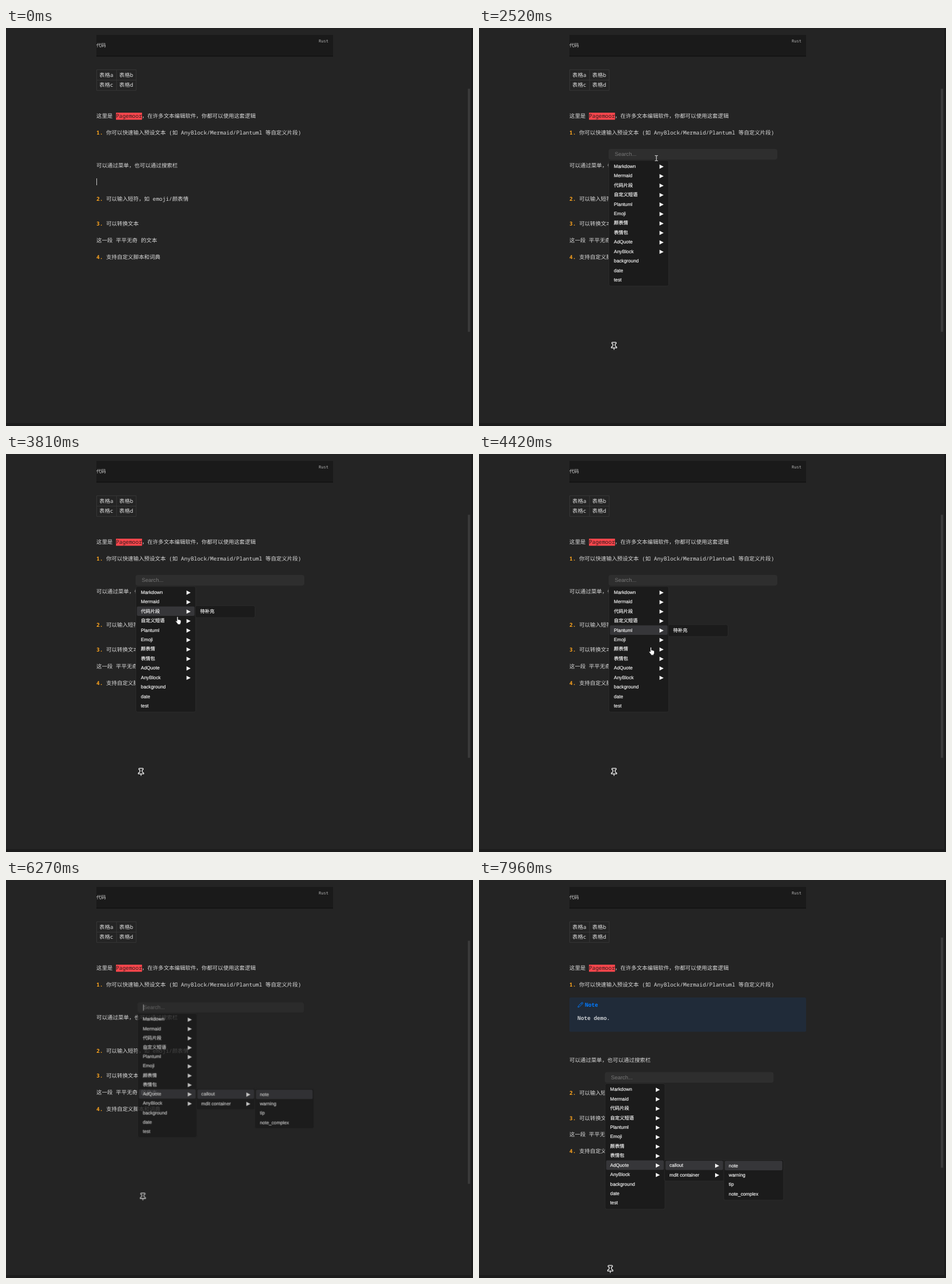
Animation of 811x691 px, one loop 8 s. Source, as an HTML page:

```html
<!DOCTYPE html>
<html lang="zh">
<head>
<meta charset="utf-8">
<style>
  html, body { margin: 0; width: 100%; height: 100%; overflow: hidden; background: #242424; }
  svg { position: fixed; left: 0; top: 0; }
  text { text-rendering: geometricPrecision; white-space: pre; }
  .doc { font: 9.42px "Noto Sans Mono", "Noto Sans CJK SC", "Noto Sans CJK JP", monospace; fill: #dadada; }
  .doc .num { fill: #ffa51e; font-weight: 600; }
  .doc .bold { font-weight: 600; }
  .doc .head { font-weight: 500; }
  .menu { font: 8.24px "Liberation Sans", "Noto Sans CJK SC", "Noto Sans CJK JP", sans-serif; }
  .menu .item { fill: #f0f0f0; stroke: #f0f0f0; stroke-width: .2px; }
</style>
</head>
<body>
<svg width="811" height="691" viewBox="0 0 811 691">
  <rect width="811" height="691" fill="#242424"/>
  <rect x="808" width="3" height="691" fill="#1c1c1c"/>
  <rect y="686" width="811" height="5" fill="#1c1c1c"/>
  <rect id="thumb" x="802" width="4" fill="#3a3a3a"/>
  <g class="doc">
    <rect x="157" y="12" width="411" height="37" fill="#1a1a1a"/>
    <rect x="157" y="48" width="411" height="1.5" fill="#101010"/>
    <path d="M157.5 72.5H226V108.3H157.5ZM192 72.5V108.3M157.5 90.5H226" fill="none" stroke="#363636"/>
    <rect x="191" y="147" width="45.2" height="12.3" fill="#fb464c"/>
    <g id="lines"></g>
    <g id="callout">
      <rect x="157" y="204" width="411" height="59.5" rx="2" fill="#202b39"/>
      <path transform="translate(171 211.5) scale(.43)" fill="none" stroke="#027aff" stroke-width="2.2" stroke-linejoin="round"
        d="M17 3a2.8 2.8 0 1 1 4 4L7.5 20.5 2 22l1.5-5.5ZM15 5l4 4"/>
      <text x="184" y="220" class="bold" style="fill:#027aff">Note</text>
      <text x="171" y="242.6" class="bold" style="fill:#c4c8cc">Note demo.</text>
    </g>
    <g id="lower"></g>
  </g>
  <rect id="caret" x="157" width="1" height="12" fill="#c8c8c8"/>
  <g id="menu" class="menu"></g>
  <path id="beam" d="M-2.5-4.5H-.6L0-4 .6-4.5H2.5M0-4V4M-2.5 4.5H-.6L0 4 .6 4.5H2.5" fill="none" stroke="#eee"/>
  <path id="hand" fill="#fff" stroke="#111" stroke-width=".8" stroke-linejoin="round"
    d="M-2.6-2Q-1.6-3.5-.5-2V2.5Q.7 1.8 1.4 2.9Q2.4 2.3 3 3.4Q4.3 3 4.5 4.6V7Q4.4 8.5 3.5 9.5V11H-1.5V9.8L-4.6 6Q-5.2 4.3-3.7 4.5L-2.6 5.5Z"/>
</svg>
<script>
const $ = id => document.getElementById(id);
const LOOP = 8000, ROW = 16.43;
const MENU_X = 225, FIRST_ROW = 240, SUB_STEP = 103;
const OPEN = 1820, CLICK = 6230, INSERT = 6550, REOPEN = 7960;

const text = (x, cy, content, attrs = '') => `<text x="${x}" y="${cy + 3.4}" ${attrs}>${content}</text>`;
const numbered = (cy, n, content) =>
  text(157, cy, `<tspan class="num">${n}.</tspan> ${content}`);

$('lines').innerHTML =
  text(157, 29.8, '代码', 'font-size="8.24"') +
  text(543, 22, 'Rust', 'font-size="7.06" style="fill:#b8b8b8"') +
  text(162, 81.2, '表格a', 'class="head"') + text(196.5, 81.2, '表格b', 'class="head"') +
  text(162, 99, '表格c') + text(196.5, 99, '表格d') +
  text(157, 153, '这里是 <tspan fill="#2c1c1d">Pagemoor</tspan>，在许多文本编辑软件，你都可以使用这套逻辑') +
  numbered(182, 1, '你可以快速输入预设文本 (如 AnyBlock/Mermaid/Plantuml 等自定义片段)');

$('lower').innerHTML =
  text(157, 239, '可以通过菜单，也可以通过搜索栏') +
  numbered(296.5, 2, '可以输入短符，如 emoji/颜表情') +
  numbered(340, 3, '可以转换文本') +
  text(157, 368.7, '这一段 平平无奇 的文本') +
  numbered(397.5, 4, '支持自定义脚本和词典');

// Menu tree: [label, children]
const leaves = names => names.split(' ').map(name => [name]);
const pending = leaves('待补充');
const kinds = leaves('note warning tip note_complex');
const tree = [
  ['Markdown', leaves('标题 列表 引用 代码 表格 链接 图片 公式 任务 脚注 分割线')],
  ['Mermaid', leaves('flowchart sequence class state er journey gantt pie mindmap timeline git')],
  ['代码片段', pending], ['自定义短语', pending], ['Plantuml', pending],
  ['Emoji', pending], ['颜表情', pending], ['表情包', pending],
  ['AdQuote', [['callout', kinds], ['mdit container', kinds]]],
  ['AnyBlock', pending], ['background'], ['date'], ['test'],
];

function panel(items, x, cy, [active, ...rest]) {
  let svg = `<rect x="${x + .5}" y="${cy - 10}" width="104" height="${items.length * ROW + 4.5}" rx="3" fill="#1b1b1b" stroke="#2b2b2b"/>`;
  let child = '';
  items.forEach(([label, children], i) => {
    const y = cy + i * ROW;
    if (i === active) {
      svg += `<rect x="${x + 2.3}" y="${y - 8.2}" width="100" height="16.4" rx="2" fill="#363639"/>`;
      if (children) child = panel(children, x + SUB_STEP, y + .4, rest);
    }
    svg += `<text class="item" x="${x + 9.3}" y="${y + 2.8}">${label}</text>`;
    if (children) svg += `<path d="M${x + 88.5} ${y - 2.9}l7.2 3.7-7.2 3.7Z" fill="#f2f2f2"/>`;
  });
  return svg + child;
}

const menuSvg = path => `
  <rect x="225" y="210" width="293" height="18.5" rx="4" fill="#2e2e2e"/>
  <text x="235.7" y="222.3" font-size="9.42" fill="#777">Search...</text>
  <rect id="inputCaret" x="235" y="214" width="1" height="11" fill="#ddd"/>
  ${panel(tree, MENU_X, FIRST_ROW, path)}
  <path transform="translate(226.7 544.4) scale(.65)" fill="none" stroke="#f4f4f4" stroke-width="2" stroke-linejoin="round"
    d="M12 17v5M5 17h14v-1.76a2 2 0 0 0-1.11-1.79l-1.78-.9A2 2 0 0 1 15 10.76V6h1a2 2 0 0 0 0-4H8a2 2 0 0 0 0 4h1v4.76a2 2 0 0 1-1.11 1.79l-1.78.9A2 2 0 0 0 5 15.24Z"/>`;

// Pointer glides: start, end, x, y
const ENTRY = { x: 311, y: 208 };
const glides = [
  [2360, 3020, 299, 282], [3100, 3160, 299, 270], [3700, 3960, 300, 305],
  [4390, 4420, 300, 338], [4420, 4720, 299, 379], [5080, 5140, 299, 374],
  [5400, 5720, 370, 374], [5840, 6030, 452, 376],
];

const progress = (t, start, end) => Math.min(1, Math.max(0, (t - start) / (end - start)));

const pointerAt = t => glides.reduce((p, [start, end, x, y]) => {
  const k = progress(t, start, end);
  return { x: p.x + (x - p.x) * k, y: p.y + (y - p.y) * k };
}, ENTRY);

// Rows open under the pointer, slightly late; moving right descends into submenus.
function hoverPath(t) {
  const { x, y } = pointerAt(t - 60);
  const row = Math.floor((y - FIRST_ROW) / ROW + .5);
  if (row < 0) return [];
  const depth = Math.max(0, Math.floor((x - MENU_X - 3) / SUB_STEP));
  return [row, ...Array(depth).fill(0)];
}

const blink = (t, since) => (t - since) % 1020 < 500;
// Editor caret placements: time, y
const placements = [[0, 261], [1120, 204.5], [INSERT, 278], [7300, 320.5]];

const show = (node, on) => node.setAttribute('visibility', on ? 'visible' : 'hidden');
let drawnPath;

function render(t) {
  const inserted = t >= INSERT;
  show($('callout'), inserted);
  $('lower').setAttribute('transform', `translate(0 ${inserted ? 73.2 : 0})`);
  $('thumb').setAttribute('y', inserted ? 100 : 105.5);
  $('thumb').setAttribute('height', inserted ? 399.5 : 422);

  const path = hoverPath(t);
  if (String(path) !== drawnPath) {
    $('menu').innerHTML = menuSvg(path);
    drawnPath = String(path);
  }
  const reopened = t >= REOPEN;
  const fade = reopened ? 0 : progress(t, CLICK, CLICK + 200);
  const open = reopened || (t >= OPEN && fade < 1);
  $('menu').setAttribute('display', open ? 'inline' : 'none');
  $('menu').setAttribute('opacity', 1 - fade);
  $('menu').setAttribute('transform', reopened ? 'translate(-6.5 123.5)'
    : `translate(480 371) scale(${1 - .064 * fade}) translate(-480 -371)`);
  show($('inputCaret'), open && !reopened && blink(t, OPEN + 40));

  const [since, caretY] = placements.findLast(([start]) => t >= start);
  const editing = t < OPEN || (inserted && !reopened);
  show($('caret'), editing && blink(t, since));
  $('caret').setAttribute('y', caretY);

  const { x, y } = pointerAt(t);
  const pointing = t >= glides[0][0] && t < CLICK;
  for (const id of ['beam', 'hand']) {
    show($(id), pointing && (id === 'beam') === (y < 231));
    $(id).setAttribute('transform', `translate(${x} ${y})`);
  }
}

function tick() {
  render(performance.now() % LOOP);
  requestAnimationFrame(tick);
}
tick();
</script>
</body>
</html>
```
